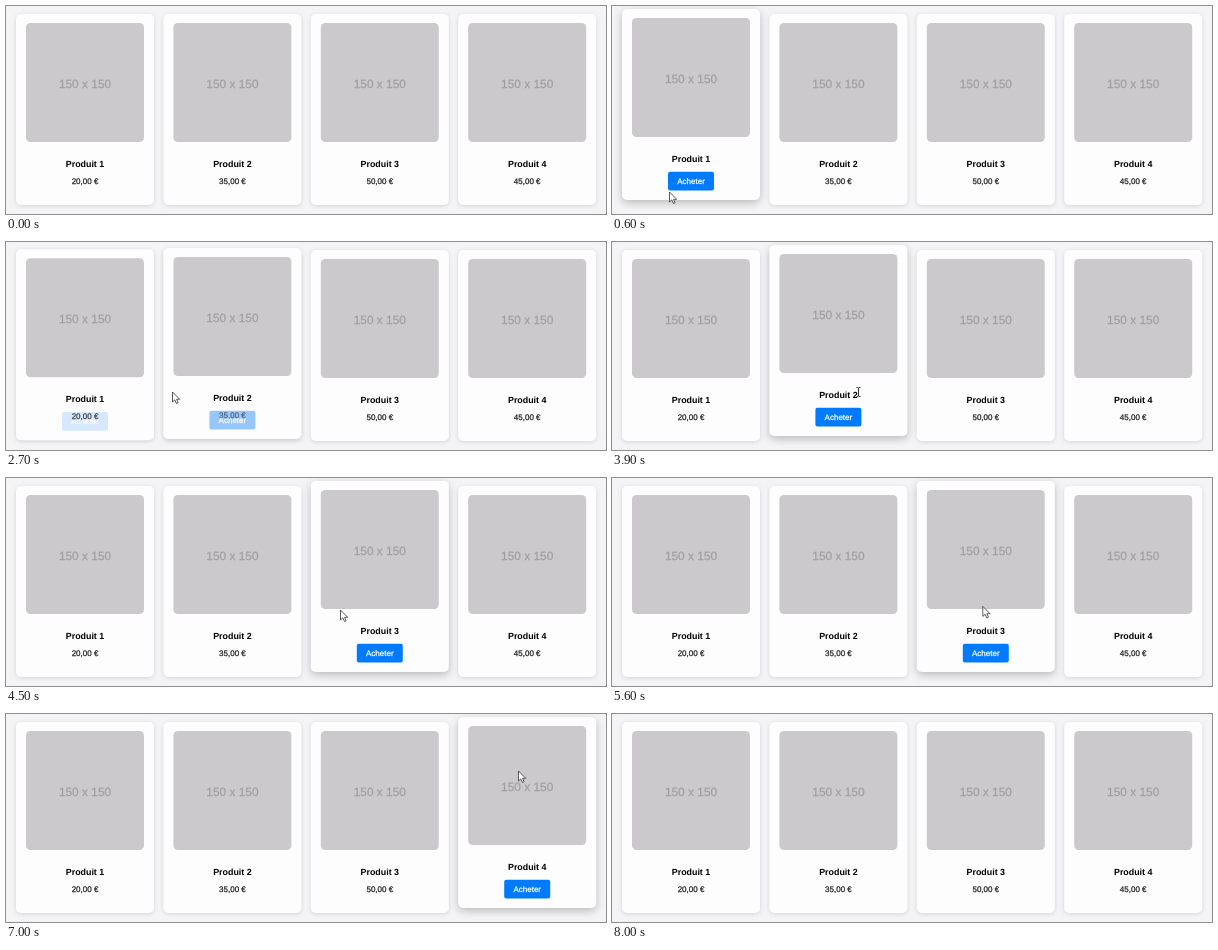
An HTML page that plays this animation: 600x208 px, repeating every 9.9 s.

```html
<!DOCTYPE html>
<html lang="fr">
<head>
<meta charset="utf-8">
<title>Produits</title>
<style>
  html, body { margin: 0; width: 100%; height: 100%; overflow: hidden; background: #f4f3f5; }
  svg { display: block; font-family: "Liberation Sans", Arial, sans-serif; text-rendering: geometricPrecision; }
  text { text-anchor: middle; stroke-width: .25; }
  .card { fill: #fefdfe; }
  .photo { fill: #cbc9cc; }
  .size { font-size: 11.9px; fill: #a19fa2; stroke: #a19fa2; }
  .title { font-size: 8.9px; font-weight: bold; fill: #000; }
  .price { font-size: 8px; fill: #222; stroke: #222; }
  .label { font-size: 8px; fill: #fff; stroke: #fff; }
  #cursor path { fill: #fff; stroke: #333; stroke-width: .8; stroke-linejoin: round; }
  #cursor .beam { fill: none; stroke-width: 1; }
</style>
</head>
<body>
<svg id="stage" width="600" height="208" viewBox="0 0 600 208">
  <g id="cards"></g>
  <g id="cursor">
    <path d="M0 0V10L2.3 7.9L4 11.5L5.6 10.8L4.1 7.3H7.2Z"/>
    <path class="beam" d="M-2 -4.5H-.6L0 -4L.6 -4.5H2M0 -4V4M-2 4.5H-.6L0 4L.6 4.5H2"/>
    <path d="M-.8 0Q0 -1 .8 0V4L5 5Q6 5.4 5.8 7L5 11H0L-3 6.5Q-3 5 -.8 6.8Z"/>
  </g>
</svg>
<script>
const LOOP = 9900, STEP = 100, FADE = 200, LIFT = 5;
const ARROW = 0, BEAM = 1, HAND = 2;

const products = [
  { price: '20,00 €', enter: 250, leave: 2590 },
  { price: '35,00 €', enter: 2650, leave: 4150 },
  { price: '50,00 €', enter: 4170, leave: 6117 },
  { price: '45,00 €', enter: 6128, leave: 7150 }
];

// Pointer stops: [time, x, y]
const stops = [
  [0, 48, 222], [600, 57.5, 186], [1000, 62, 183], [2000, 106, 150], [2600, 106, 150],
  [2700, 166.5, 150], [3900, 246.5, 150], [4500, 334.5, 132], [4900, 366, 128],
  [5500, 366, 128], [6000, 390, 130], [6200, 499.5, 129], [6800, 510, 128], [7200, 515, -14]
];

const $ = id => document.getElementById(id);
const mix = (a, b, k) => a + (b - a) * k;
const centre = i => 79 + 147.4 * i;

// CSS "ease" curve: solve x(s) = k by bisection, then return y(s)
function ease(k) {
  if (k <= 0 || k >= 1) return k <= 0 ? 0 : 1;
  const bezier = (s, a, b) => 3 * s * (1 - s) ** 2 * a + 3 * s * s * (1 - s) * b + s ** 3;
  let s = .5;
  for (let d = .25; d > .001; d /= 2) s += bezier(s, .25, .25) < k ? d : -d;
  return bezier(s, .1, 1);
}

function pointer(t) {
  const i = stops.findIndex(s => s[0] > t);
  if (i < 0) return stops[stops.length - 1].slice(1);
  const [t0, x0, y0] = stops[i - 1], [t1, x1, y1] = stops[i];
  const k = (t - t0) / (t1 - t0);
  return [mix(x0, x1, k), mix(y0, y1, k)];
}

function shapeAt(x, y) {
  const dx = Math.min(...products.map((_, i) => Math.abs(x - centre(i))));
  if (dx < 22 && y > 148 && y < 158) return BEAM;
  return dx < 23 && y > 166 && y < 184.5 ? HAND : ARROW;
}

$('cards').innerHTML = products.map((p, i) => `
  <g>
    <rect class="card" x="-69" y="8" width="138" height="191" rx="5"/>
    <rect class="photo" x="-59" y="17" width="118" height="119" rx="4.5"/>
    <text class="size" y="82">150 x 150</text>
    <text class="title" y="161.2">Produit ${i + 1}</text>
    <g class="buy">
      <rect x="-23" y="170.8" width="46" height="18.7" rx="2"/>
      <text class="label" y="182.9">Acheter</text>
    </g>
    <text class="price" y="177.8">${p.price}</text>
  </g>`).join('');

const cards = [...$('cards').children].map(group => ({
  group,
  box: group.querySelector('.card'),
  price: group.querySelector('.price'),
  buy: group.querySelector('.buy'),
  face: group.querySelector('.buy rect')
}));
const shapes = [...$('cursor').children];

function draw(t) {
  const [x, y] = pointer(t);
  const shape = shapeAt(x, y);

  cards.forEach((c, i) => {
    const { enter, leave } = products[i];
    const p = ease((t - enter) / FADE) - ease((t - leave) / FADE);
    const pressed = shape === HAND && Math.abs(x - centre(i)) < 23;
    c.group.setAttribute('transform', `translate(${centre(i)} ${-LIFT * p})`);
    c.box.style.filter =
      `drop-shadow(0 ${mix(1.5, 3, p)}px ${mix(2, 4, p)}px rgba(0,0,0,${mix(.13, .23, p)}))`;
    c.price.style.opacity = 1 - p;
    c.buy.style.opacity = p;
    c.face.style.fill = pressed ? '#0056b3' : '#007bff';
  });

  shapes.forEach((s, i) => s.style.display = i === shape ? '' : 'none');
  $('cursor').setAttribute('transform', `translate(${x} ${y})`);
}

const start = performance.now();
function tick() {
  const t = (performance.now() - start) % LOOP;
  draw(Math.floor(t / STEP) * STEP);
  requestAnimationFrame(tick);
}
tick();
</script>
</body>
</html>
```
